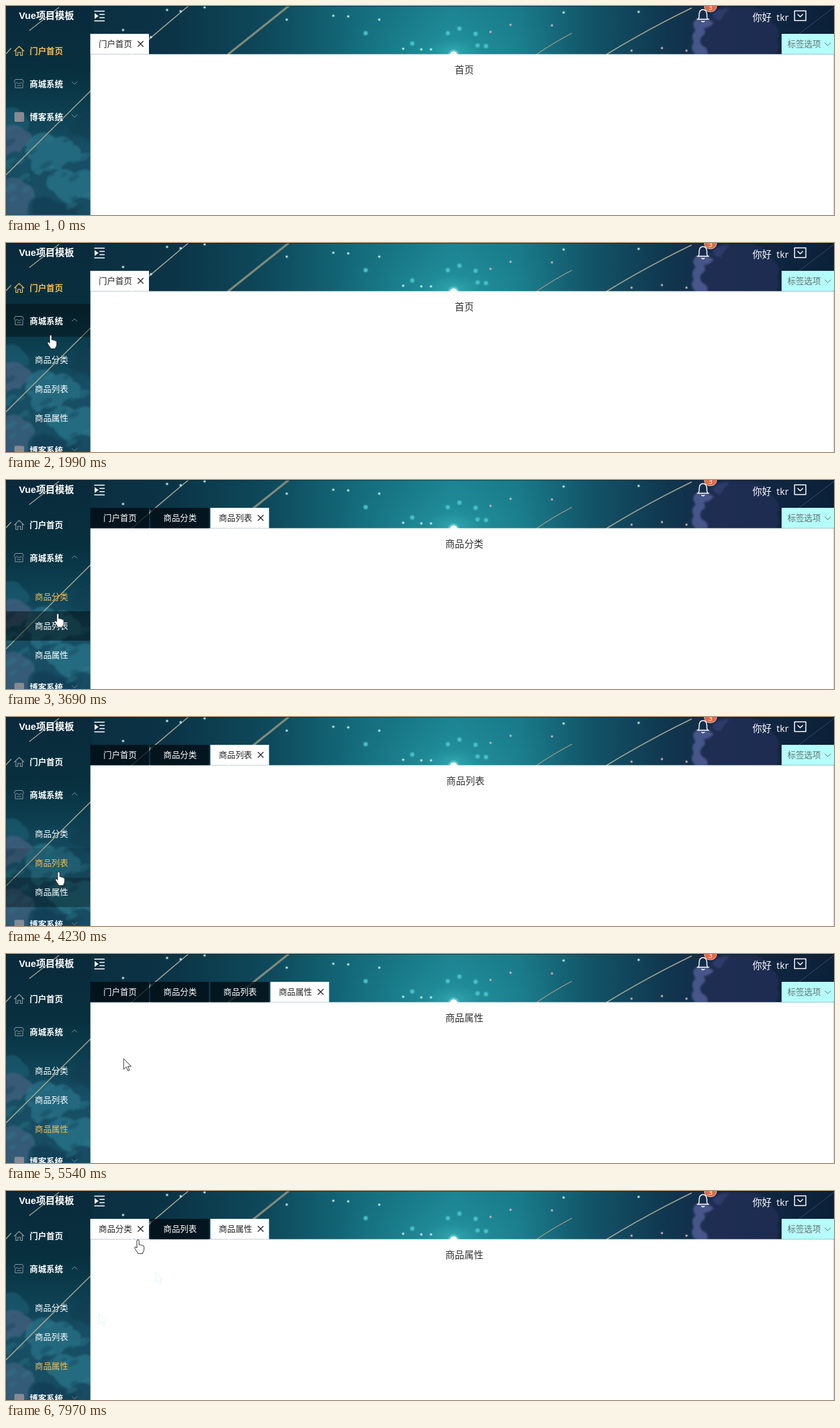
Animation, 1280 px wide and 323 px high, one loop 8 s. Source, as an HTML page:

```html
<!DOCTYPE html>
<html lang="zh">
<head>
<meta charset="utf-8">
<title>Vue项目模板</title>
<style>
html, body { margin: 0; width: 100%; height: 100%; overflow: hidden; background: #fff; }
#stage { display: block; position: absolute; left: 0; top: 0; }
text { font-family: "Noto Sans CJK SC", "Noto Sans CJK", sans-serif; font-size: 12.9px; white-space: pre; }
.big { font-size: 14.7px; }
.bold { font-weight: 700; }
.latin { font-family: "Liberation Sans", sans-serif; }
.light { font-family: "Open Sans", sans-serif; }
.line { fill: none; stroke-width: 1.2; stroke-linecap: round; stroke-linejoin: round; }
</style>
</head>
<body>
<svg id="stage" width="1280" height="323" viewBox="0 0 1280 323">
  <defs>
    <linearGradient id="sky">
      <stop offset="0" stop-color="#0a2a3c"/>
      <stop offset=".2" stop-color="#0b3446"/>
      <stop offset=".32" stop-color="#0e4a5c"/>
      <stop offset=".42" stop-color="#146a7a"/>
      <stop offset=".54" stop-color="#1c8492"/>
      <stop offset=".62" stop-color="#197a89"/>
      <stop offset=".71" stop-color="#125367"/>
      <stop offset=".8" stop-color="#10364e"/>
      <stop offset=".86" stop-color="#152a48"/>
      <stop offset="1" stop-color="#0b2038"/>
    </linearGradient>
    <linearGradient id="side" x2="0" y2="1">
      <stop offset="0" stop-color="#0a2a3c"/>
      <stop offset=".32" stop-color="#08303f"/>
      <stop offset=".5" stop-color="#0c3f50"/>
      <stop offset=".68" stop-color="#174f65"/>
      <stop offset="1" stop-color="#184c62"/>
    </linearGradient>
    <radialGradient id="glow">
      <stop offset="0" stop-color="#3fc0c4" stop-opacity=".6"/>
      <stop offset=".25" stop-color="#2aa0aa" stop-opacity=".35"/>
      <stop offset="1" stop-color="#1c8492" stop-opacity="0"/>
    </radialGradient>
    <filter id="soft" x="-5%" y="-5%" width="110%" height="110%"><feGaussianBlur stdDeviation="1.5"/></filter>
  </defs>

  <g id="scenery">
    <rect width="1280" height="75" fill="url(#sky)"/>
    <rect width="131" height="323" fill="url(#side)"/>
    <ellipse cx="692" cy="70" rx="180" ry="80" fill="url(#glow)"/>
    <g id="clouds" filter="url(#soft)"></g>
    <g fill="none" stroke="#a9a892">
      <path d="M0 261Q66 195 130 132Q200 68 282 0" stroke-width="1.5"/>
      <path d="M0 74L8 65M36 38L82 2" stroke-width="1.3"/>
      <path d="M343 75L437 0" stroke="#7f8a79" stroke-width="3.4"/>
      <path d="M820 75Q846 57 875 42" stroke="#a59c80" stroke-width="1.4"/>
      <path d="M928 75Q992 36 1060 3" stroke-width="1.5"/>
      <path d="M1226 43L1280 2" stroke="#3d4a63"/>
    </g>
    <g id="stars"></g>
    <rect width="1280" height="1" fill="#021018" opacity=".5"/>
  </g>

  <rect x="130.5" y="74.5" width="1148.5" height="248.5" fill="#fff"/>
  <rect x="1279" y="75" width="1" height="248" fill="#d5dadc"/>

  <g fill="#fff">
    <text x="20" y="20.3" class="big bold"><tspan class="latin">Vue</tspan>项目模板</text>
    <text x="1154" y="23" class="big">你好</text>
    <text x="1191" y="23" class="big light">tkr</text>
    <path d="M137 11V20L143 15.5Z"/>
  </g>
  <g class="line" stroke="#fff" style="stroke-width:1.5">
    <path d="M137 8H152M145 13H152M145 18H152M137 23H152"/>
    <path d="M1219 7.5H1236.5V22.5H1219ZM1224 13L1227.8 16.8L1231.6 13"/>
    <path d="M1068.5 20.5H1086.5M1070.5 20Q1072 17 1071.5 13Q1072 5.5 1077.5 5.5Q1083 5.5 1083.5 13Q1083 17 1084.5 20M1075.5 23.5Q1077.5 25.5 1079.5 23.5"/>
  </g>
  <rect x="1079.5" y="-8" width="19" height="17" rx="8.5" fill="#e36a43" stroke="#f3d9cf" stroke-width=".8"/>
  <text x="1085.8" y="6" fill="#fff" class="light" style="font-size:11px">3</text>

  <rect x="1199" y="43" width="81" height="31.5" fill="#b5fdfb"/>
  <text x="1208" y="63.4" fill="#66706f">标签选项</text>
  <path class="line" d="M1266 57L1270.3 61.3L1274.6 57" stroke="#66706f" style="stroke-width:1"/>

  <g id="tabs"></g>
  <g id="ghosts" fill="none" stroke="#e3f3fa" stroke-width="1"></g>
  <g class="page" fill="#303133" text-anchor="middle">
    <text id="oldPage" class="big" y="103.7"/>
    <text id="newPage" class="big" y="103.7"/>
  </g>

  <g id="menu">
    <rect id="mallHover" y="94" width="130" height="51"/>
    <path id="homeIcon" class="line" d="M13 69.5L20.3 62.5L27.6 69.5M15.2 68V76.5H18.3V71.5H22.3V76.5H25.4V68"/>
    <text id="homeText" class="bold" x="36.5" y="74.3">门户首页</text>
    <path class="line" stroke="#8a959b" style="stroke-width:1" d="M14.8 113.5H25.4L27.4 117.5Q25.5 121 23.4 118.2Q20.3 121.5 17 118.2Q14.6 121 12.8 117.5ZM14.2 120.5V126.5H26V120.5M17.5 123H22.8"/>
    <text class="bold" x="36.5" y="125.1" fill="#fff">商城系统</text>
    <path id="mallArrow" class="line" stroke="#7d8c95" style="stroke-width:1" d="M-4-2L0 2L4-2"/>
    <svg id="sub" y="145" width="130" height="0" overflow="hidden"></svg>
    <g id="blog">
      <rect x="13" y="164" width="15" height="15" rx="2" fill="#858a93"/>
      <text class="bold" x="36.5" y="175.6" fill="#fff">博客系统</text>
      <path class="line" stroke="#7d8c95" style="stroke-width:1" d="M102 168L106 172L110 168"/>
    </g>
  </g>

  <circle id="click" r="12" fill="#ff0" fill-opacity=".47"/>
  <g id="cursor" fill="#fff" stroke="#1c1c1c" stroke-width=".9" stroke-linejoin="round">
    <path id="arrow" d="M0 0V16.5L4 12.8L6.6 18.8L9 17.8L6.4 12H11.5Z"/>
    <path id="hand" d="M-1.7 1.2a1.7 1.7 0 0 1 3.4 0V7.2q1.6-.9 2.6.5q1.6-.7 2.5.7q2.4-.3 2.5 2V14q0 3-1.8 5V20.7H0q-1-3-3.2-5.2L-5 12.4q-.6-1.8 1-2q1.2 0 2.3 1.6z"/>
  </g>
</svg>

<script>
const LOOP = 8000, PITCH = 92.8, SUB_HEIGHT = 149.5;
const WHITE = [255, 255, 255], GOLD = [248, 186, 76], GREY = [138, 149, 155];
const names = ['门户首页', '商品分类', '商品列表', '商品属性'];
const pages = ['首页', ...names.slice(1)];
const visits = [0, 2770, 3690, 4930];
const CLOSED = 7570;

const $ = id => document.getElementById(id);
const clamp = v => Math.min(1, Math.max(0, v));
const ramp = (t, from, to) => clamp((t - from) / (to - from));
const easeOut = p => 1 - (1 - p) ** 3;
const within = (t, [from, to]) => t >= from && t < to;
const blend = (a, b, p) => `rgb(${a.map((v, i) => Math.round(v + (b[i] - v) * p))})`;

function add(parent, tag, attrs, label) {
  const node = document.createElementNS('http://www.w3.org/2000/svg', tag);
  for (const key in attrs) node.setAttribute(key, attrs[key]);
  if (label) node.textContent = label;
  parent.appendChild(node);
  return node;
}
function set(node, attrs) {
  for (const key in attrs) node.setAttribute(key, attrs[key]);
}

// Scenery
let seed = 11;
const random = () => (seed = (seed * 16807) % 2147483647) / 2147483647;

const patch = (fill, opacity, d) => add($('clouds'), 'path', { fill, opacity, d });
function flecks(x, y, w, h, fill, count, opacity) {
  for (let i = 0; i < count; i++) {
    const px = x + random() * w, py = y + random() * h, rx = 3 + random() * 9;
    add($('clouds'), 'ellipse', {
      cx: px, cy: py, rx, ry: rx * .45, fill, opacity, transform: `rotate(-28 ${px} ${py})`
    });
  }
}
patch('#1c5c70', .7, 'M0 158Q18 152 26 168Q40 176 34 190Q14 186 0 196Z');
patch('#4c6584', .65, 'M0 186Q16 180 30 192Q46 200 40 214Q28 212 22 226Q10 222 0 232Z');
patch('#277287', .75, 'M36 206Q58 186 76 204Q98 196 104 214Q122 218 112 240Q92 236 84 254Q60 246 52 262Q34 258 40 238Q22 230 36 206Z');
patch('#2a788c', .7, 'M66 262Q88 244 106 258Q124 248 131 256V300Q112 290 98 306Q80 300 74 286Q56 282 66 262Z');
patch('#4a6786', .6, 'M0 268Q16 260 28 274Q46 278 44 296Q32 300 34 323H0Z');
patch('#123e54', .7, 'M42 300Q62 290 78 304Q104 308 112 323H40Z');
patch('#0f3d50', .6, 'M131 160Q112 166 104 182Q92 192 108 200Q122 198 131 210Z');
flecks(5, 195, 120, 120, '#2f7d90', 18, .35);
flecks(0, 205, 110, 110, '#143f57', 14, .35);
patch('#202d54', .85, 'M1074 75Q1066 58 1080 46Q1072 22 1092 12Q1104 -4 1124 2H1150Q1178 4 1184 24Q1200 36 1192 52Q1198 64 1190 75Z');
patch('#505f94', .85, 'M1066 75Q1056 66 1063 56Q1058 44 1066 38Q1058 26 1068 20Q1082 18 1094 26Q1086 34 1078 34Q1084 42 1075 48Q1070 56 1077 62Q1086 66 1084 75Z');
patch('#3a477c', .6, 'M1092 14Q1102 2 1118 4Q1110 12 1104 22Q1098 22 1092 14Z');

const starSets = [
  ['#c9f4ef', 1.6, [[181, 37], [249, 6], [270, 8], [434, 21], [224, 48], [506, 15], [529, 16], [577, 21], [307, 2], [862, 10], [978, 9], [642, 67], [657, 67], [614, 66]]],
  ['#4cc3c9', 3, [[556, 42], [628, 58], [683, 42], [701, 35], [726, 43], [729, 61], [742, 62]]],
  ['#e2b6c8', 1.5, [[780, 29], [844, 30], [967, 69], [1052, 69], [1014, 65], [749, 40]]]
];
for (const [fill, r, points] of starSets)
  for (const [cx, cy] of points) {
    add($('stars'), 'circle', { cx, cy, r: r * 1.6, fill, opacity: .2 });
    add($('stars'), 'circle', { cx, cy, r, fill, opacity: .9 });
  }
add($('stars'), 'circle', { cx: 692, cy: 76, r: 9, fill: '#a6f2ee', opacity: .35 });
add($('stars'), 'circle', { cx: 692, cy: 76, r: 6, fill: '#f2fffd' });

// Tabs and submenu
const tabs = names.map(name => {
  const g = add($('tabs'), 'g', {});
  return {
    g,
    box: add(g, 'rect', { x: .3, y: 43, width: 90.7, height: 31.5 }),
    ring: add(g, 'circle', { cx: 78, cy: 59, r: 9, fill: '#d3d5d8' }),
    label: add(g, 'text', { y: 63.4 }, name),
    cross: add(g, 'path', { class: 'line', d: 'M74 54.5L82 62.5M82 54.5L74 62.5', stroke: '#222' })
  };
});
const rows = names.slice(1).map((name, i) => ({
  box: add($('sub'), 'rect', { y: 12.5 + 45.4 * i, width: 130, height: 45.4 }),
  label: add($('sub'), 'text', { x: 44.5, y: 39.7 + 45.3 * i }, name)
}));
for (const [x, y] of [[231, 125], [144, 190]])
  add($('ghosts'), 'path', { d: $('arrow').getAttribute('d'), transform: `translate(${x} ${y})` });

// Pointer track: time, x, y
const track = [
  [360, 1208, 147], [590, 154, 105], [970, 154, 105], [1300, 70, 120], [1430, 67, 122],
  [1830, 67, 122], [2290, 73, 181], [2900, 73, 181], [3530, 80, 207], [3830, 80, 207],
  [4380, 82, 252], [5300, 82, 252], [5480, 144, 190], [5620, 231, 125], [5720, 243, 86],
  [5850, 252, 66], [6020, 240, 62], [6200, 200, 62], [6410, 212, 64], [6650, 212, 64],
  [6720, 212, 63], [6869, 212, 63], [6870, 211, 62], [7889, 211, 62], [7890, 208, 69],
  [7969, 208, 69], [7970, 204, 76]
];
const handTimes = [[1120, 5380], [5760, LOOP]];
const clicks = [[1430, 1510], [2600, 2770], [3610, 3690], [4760, 4930], [7420, 7570]];
const hovers = [[1150, 1950], [2100, 3200], [3200, 4080], [4080, 5320]];

function drawPointer(t) {
  const next = track.findIndex(k => k[0] > t);
  const b = next < 0 ? track[track.length - 1] : track[next];
  const a = track[next < 0 ? track.length - 1 : Math.max(0, next - 1)];
  const p = a === b ? 0 : ramp(t, a[0], b[0]);
  const x = a[1] + (b[1] - a[1]) * p, y = a[2] + (b[2] - a[2]) * p;
  const isHand = handTimes.some(span => within(t, span));
  set($('cursor'), { transform: `translate(${x} ${y})`, visibility: t < 360 ? 'hidden' : 'visible' });
  set($('hand'), { display: isHand ? 'inline' : 'none' });
  set($('arrow'), { display: isHand ? 'none' : 'inline' });
  set($('click'), { cx: x, cy: y, opacity: clicks.some(span => within(t, span)) ? 1 : 0 });
  set($('ghosts'), { visibility: t > 5720 ? 'visible' : 'hidden' });
}

function drawTabs(t, current) {
  const closed = t >= CLOSED;
  const hovered = closed ? 1 : within(t, [5800, 6090]) ? 1 : t >= 6090 ? 0 : -1;
  tabs.forEach((tab, i) => {
    const open = t >= visits[i] && !(closed && i === 0);
    const lit = i === current || i === hovered;
    const ringed = i === hovered && within(t, [6330, 7890]);
    set(tab.g, {
      display: open ? 'inline' : 'none',
      transform: `translate(${130 + (i - closed) * PITCH} 0)`
    });
    set(tab.box, { fill: lit ? '#fff' : '#020c12', 'fill-opacity': lit ? 1 : .78 });
    set(tab.label, { x: lit ? (ringed ? 11.5 : 13.3) : 20.5, fill: lit ? '#222' : '#fff' });
    set(tab.cross, { display: lit ? 'inline' : 'none' });
    set(tab.ring, { display: ringed ? 'inline' : 'none' });
  });
}

function drawPage(t, current) {
  const age = current ? t - visits[current] : 9999;
  const p = easeOut(ramp(age, 230, 640));
  $('oldPage').textContent = current ? pages[current - 1] : '';
  $('newPage').textContent = pages[current];
  set($('oldPage'), { x: 708.5, opacity: 1 - ramp(age, 70, 240) });
  set($('newPage'), { x: 708.5 + 123 * (1 - p), opacity: p });
}

function drawMenu(t, current) {
  const tint = (i, base) => {
    const on = i ? ramp(t, visits[i] + 70, visits[i] + 370) : 1;
    const off = i < 3 ? ramp(t, visits[i + 1] + 70, visits[i + 1] + 370) : 0;
    return blend(base, GOLD, on * (1 - off));
  };
  const shadeOf = i => .45 * ramp(t, hovers[i][0], hovers[i][0] + 200)
    * (1 - ramp(t, hovers[i][1], hovers[i][1] + 200));
  const open = easeOut(ramp(t, 1590, 1870)) * (t >= 1600);
  set($('homeText'), { fill: tint(0, WHITE) });
  set($('homeIcon'), { stroke: blend(GREY, GOLD, current ? 0 : 1) });
  set($('mallHover'), { opacity: shadeOf(0) });
  set($('mallArrow'), { transform: `translate(106 119) rotate(${180 * open})` });
  set($('sub'), { height: SUB_HEIGHT * open });
  set($('blog'), { transform: `translate(0 ${SUB_HEIGHT * open})` });
  rows.forEach((row, i) => {
    set(row.box, { opacity: shadeOf(i + 1) });
    set(row.label, { fill: tint(i + 1, WHITE) });
  });
}

function draw(now) {
  const t = now % LOOP;
  const current = visits.filter(v => v <= t).length - 1;
  drawTabs(t, current);
  drawPage(t, current);
  drawMenu(t, current);
  drawPointer(t);
}

const start = performance.now();
function tick() {
  draw(performance.now() - start);
  requestAnimationFrame(tick);
}
tick();
</script>
</body>
</html>
```
